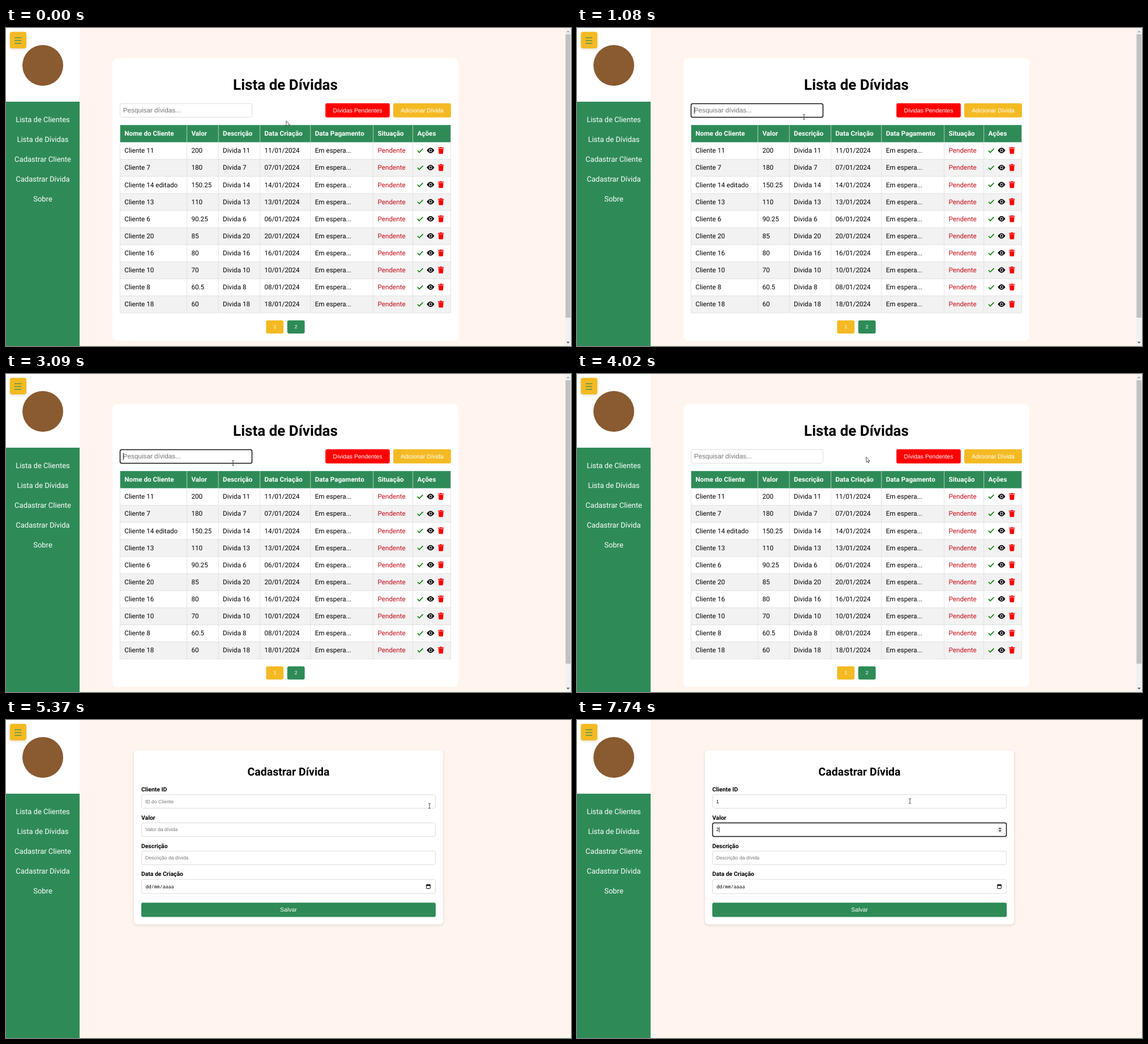
Animation, 998 px wide and 561 px high, one loop 8 s. Source, as an HTML page:

```html
<!DOCTYPE html>
<html lang="pt-BR">
<head>
<meta charset="utf-8">
<title>Lista de Dívidas</title>
<style>
  html, body { margin: 0; width: 100%; height: 100%; overflow: hidden; background: #fff4ee; }
  svg { display: block; width: 100vw; height: 100vh; }
  text { font-family: Roboto, sans-serif; white-space: pre; text-rendering: geometricPrecision; }
  .ui { font-family: "Liberation Sans", Arial, sans-serif; }
  .mono { font-family: "Noto Sans Mono", monospace; }
  .b { font-weight: 700; }
  .mid { text-anchor: middle; }
</style>
</head>
<body>
<svg id="stage" viewBox="0 0 998 561"></svg>
<script>
const LOOP = 8000, BLINK = 530;
const GREEN = '#2e8b57', YELLOW = '#f4ba24', LINE = '#dcdcdc', HINT = '#757575';
const QUERY = 'renildo';

const rect = (x, y, w, h, fill, r = 0, extra = '') =>
  `<rect x="${x}" y="${y}" width="${w}" height="${h}" rx="${r}" fill="${fill}" ${extra}/>`;
const text = (x, y, size, str, cls = '', fill = '#000', id = '') =>
  `<text x="${x}" y="${y}" font-size="${size}" class="${cls}" fill="${fill}" ${id && `id="${id}"`}>${str}</text>`;
const path = (d, extra) => `<path d="${d}" ${extra}/>`;
const group = (id, body) => `<g id="${id}">${body}</g>`;
const button = (x, y, w, h, fill, label, size) =>
  rect(x, y, w, h, fill, 3) + text(x + w / 2, y + h / 2 + size * .34, size, label, 'ui mid', '#fff');

// An input box with a hint, a value, a caret and a focus ring
function field(id, x, y, w, h, size, pad, hint) {
  const base = y + h / 2 + size * .34;
  return rect(x + .5, y + .5, w - 1, h - 1, '#fff', 3, `id="${id}-box"`) +
    text(x + pad, base, size, hint, 'ui', HINT, id + '-hint') +
    text(x + pad, base, size, '', 'ui', '#000', id + '-text') +
    rect(0, y + h / 2 - size * .55, .8, size * 1.1, '#000', 0, `id="${id}-caret"`);
}

const icons = (x, y) =>
  path(`M${x - 4.6} ${y + .3}l3 3.2 6.4 -6.6`, 'fill="none" stroke="#008000" stroke-width="1.6"') +
  path(`M${x + 11.7} ${y}q6.6 -9.6 13.2 0q-6.6 9.6 -13.2 0z`, 'fill="#000"') +
  `<circle cx="${x + 18.3}" cy="${y}" r="2.9" fill="#fff"/><circle cx="${x + 18.3}" cy="${y}" r="1.9" fill="#000"/>` +
  path(`M${x + 31.5} ${y - 5.3}h3l.6 -.8h3l.6 .8h3v1.5h-10.2z` +
       `M${x + 32.2} ${y - 3.1}h8.8l-.6 7.8q-.1 1.3 -1.4 1.3h-4.8q-1.3 0 -1.4 -1.3z`, 'fill="#f00"');

const HEADS = ['Nome do Cliente', 'Valor', 'Descrição', 'Data Criação', 'Data Pagamento', 'Situação', 'Ações'];

function table(cols, rows) {
  const top = 171.2, headH = 30.3, rowH = 30.12;
  const left = cols[0], right = cols[cols.length - 1];
  const bottom = top + headH + rows.length * rowH;
  let out = rect(left, top, right - left, headH, GREEN);
  HEADS.forEach((h, i) => out += text(cols[i] + 7.9, 190.3, 11.7, h, 'b', '#fff'));
  let lines = '';
  rows.forEach((row, r) => {
    const y = top + headH + r * rowH;
    if (r % 2) out += rect(left, y, right - left, rowH, '#f2f2f2');
    [...row, 'Em espera...', 'Pendente'].forEach((s, i) =>
      out += text(cols[i] + 7.9, y + 18.8, 11.7, s, '', i === 5 ? '#c40a14' : '#000'));
    out += icons(cols[6] + 13, y + 14.6);
    lines += `M${left} ${y + rowH}H${right}`;
  });
  cols.forEach(x => lines += `M${x} ${top}V${bottom}`);
  return out + path(lines, `fill="none" stroke="${LINE}" stroke-width=".8"`);
}

function listPage(x, height, cols, rows, pages) {
  const mid = x + 305.5, pageY = 53.3 + height - 36.3;
  let out = rect(x, 53.3, 611, height, '#fff', 8) +
    text(mid, 108.5, 26, 'Lista de Dívidas', 'b mid') +
    button(x + 376.2, 132.8, 113.6, 25, '#f00', 'Dívidas Pendentes', 10.4) +
    button(x + 496, 132.8, 102, 25, YELLOW, 'Adicionar Dívida', 10.4) +
    table(cols, rows);
  for (let i = 0; i < pages; i++)
    out += button(mid - 15.4 - (pages - 1) * 18.7 + i * 37.4, pageY, 30.8, 23.4, i ? GREEN : YELLOW, i + 1, 8.67);
  return out;
}

const debts = [[11, '200'], [7, '180'], [14, '150.25'], [13, '110'], [6, '90.25'],
  [20, '85'], [16, '80'], [10, '70'], [8, '60.5'], [18, '60']].map(([n, value]) =>
  [`Cliente ${n}${n === 14 ? ' editado' : ''}`, value, `Divida ${n}`, `${String(n).padStart(2, '0')}/01/2024`]);

const scrollbar = rect(987.5, 0, 10.5, 561, '#f1f1f1') + rect(988.4, 11, 8.8, 500, '#c1c1c1') +
  path('M990 7.4l2.8 -3 2.8 3z', 'fill="#a3a3a3"') + path('M990 553.6l2.8 3 2.8 -3z', 'fill="#505050"');

const label = (y, s) => text(239, y, 10.4, s, 'b');
const formField = (id, y, hint) => field(id, 239, y, 520, 25, 8.67, 7, hint);
const formPage =
  rect(226, 53.5, 546, 307, '#fff', 6, 'filter="url(#soft)"') +
  text(499, 98, 19.5, 'Cadastrar Dívida', 'b mid') +
  label(125.8, 'Cliente ID') + label(175.6, 'Valor') + label(225.5, 'Descrição') + label(275.4, 'Data de Criação') +
  formField('client', 131.2, 'ID do Cliente') +
  formField('value', 181, 'Valor da dívida') +
  formField('note', 230.8, 'Descrição da dívida') +
  rect(239.5, 281.2, 519, 25, '#fff', 3, `stroke="${LINE}"`) +
  text(246.4, 296.6, 8.4, 'dd/mm/aaaa', 'mono') +
  rect(742.7, 290.8, 6.6, 6.6, 'none', .5, 'stroke="#000" stroke-width="1"') +
  rect(742.4, 290.4, 7.2, 2.2, '#000') + rect(743.6, 289.6, 1, 2, '#000') + rect(747.4, 289.6, 1, 2, '#000') +
  group('spinner', rect(742, 188.4, 10, 10.4, '#efefef') +
    path('M744.4 192.6l2.7 -3 2.7 3zM744.4 194.6l2.7 3 2.7 -3z', 'fill="#404040"')) +
  button(239, 322.3, 520, 25.2, GREEN, 'Salvar', 10.4);

const sidebar = rect(0, 0, 130, 561, GREEN) + rect(0, 0, 130, 130, '#fff') +
  '<circle cx="65" cy="66" r="36" fill="#8a5a30"/>' +
  rect(6.8, 6.8, 29.2, 29.2, YELLOW, 4, 'filter="url(#soft)"') +
  path('M15.2 17.2h11.8m-11.8 5h11.8m-11.8 5h11.8', `stroke="${GREEN}" stroke-width="1.3"`) +
  ['Lista de Clientes', 'Lista de Dívidas', 'Cadastrar Cliente', 'Cadastrar Dívida', 'Sobre']
    .map((s, i) => text(65, 165.8 + i * 35.1, 13, s, 'mid', '#fff')).join('');

const pointers =
  group('arrow', path('M0 0V9.2L2.1 7.3L3.5 10.3L4.9 9.7L3.6 6.8H6.3Z', 'fill="#fff" stroke="#222" stroke-width=".8"')) +
  group('beam', path('M-2 -4.2h1.4l.6 .5 .6 -.5h1.4M0 -3.8V3.8M-2 4.2h1.4l.6 -.5 .6 .5h1.4',
    'fill="none" stroke="#333" stroke-width=".9"')) +
  group('hand', path('M-1 .2q1 -1 2 0V4l4.3 .8q1 .3 .9 1.4L5.5 10.6H.4L-3 6.6q0 -1.3 1.2 -.9l.8 .6z',
    'fill="#fff" stroke="#222" stroke-width=".8"'));

const stage = document.getElementById('stage');
stage.innerHTML =
  '<defs><filter id="soft" x="-20%" y="-20%" width="140%" height="150%">' +
  '<feDropShadow dx="0" dy="1.5" stdDeviation="2" flood-color="#000" flood-opacity=".14"/></filter></defs>' +
  rect(0, 0, 998, 561, '#fff4ee') + rect(130, 560, 868, 1, '#effbdf') +
  group('full', listPage(188, 498.7, [201.4, 319.5, 375.2, 448.6, 537.8, 648.6, 718.6, 785.6], debts, 2) + scrollbar) +
  group('found', listPage(193.8, 227.5, [207.1, 321, 369.1, 444.6, 536.2, 650.1, 722.3, 791.3],
    [['Renildo Tivaro', '50', 'TESTE', '23/06/2024']], 1)) +
  group('search', field('query', 201, 132.9, 234, 25, 11.7, 5.8, 'Pesquisar dívidas...')) +
  group('form', formPage) + sidebar + group('pointer', pointers);

const el = {};
stage.querySelectorAll('[id]').forEach(n => el[n.id] = n);
const show = (id, on) => el[id].setAttribute('display', on ? 'inline' : 'none');

function setField(id, value, focused, lastKey, t) {
  const box = el[id + '-box'], words = el[id + '-text'], caret = el[id + '-caret'];
  box.setAttribute('stroke', focused ? '#101010' : LINE);
  box.setAttribute('stroke-width', focused ? 1.5 : 1);
  words.textContent = value;
  show(id + '-hint', !value);
  caret.setAttribute('x', +words.getAttribute('x') + (value ? words.getComputedTextLength() : 0));
  show(id + '-caret', focused && Math.floor((t - lastKey) / BLINK) % 2 === 0);
}

// Moments of the story, in ms
const AT = {
  focus: 780, type: 1120, found: 1260, erase: 2300, full: 2720, blur: 3860, form: 4920,
  client: 6600, one: 6840, value: 7110, two: 7680
};
const TYPE_GAP = 95, ERASE_GAP = 60;

// Pointer stops: start time, end time, destination
const START = [495, 164];
const MOVES = [[30, 680, 401, 157], [3300, 3800, 511, 146.5], [4080, 4680, 748, 151.5], [6180, 6540, 588, 143]];
function pointerAt(t) {
  let [x, y] = START;
  for (const [from, to, nx, ny] of MOVES) {
    const k = Math.min(1, Math.max(0, (t - from) / (to - from))), e = k * k * (3 - 2 * k);
    x += (nx - x) * e;
    y += (ny - y) * e;
  }
  return [x, y];
}

const presses = (t, start, gap) => Math.max(0, Math.min(QUERY.length, Math.floor((t - start) / gap) + 1));
const latest = (t, ...times) => Math.max(...times.filter(k => k <= t), 0);

function draw(t) {
  const form = t >= AT.form, found = t >= AT.found && t < AT.full;
  show('full', !form && !found);
  show('found', found);
  show('search', !form);
  show('form', form);

  const typed = presses(t, AT.type, TYPE_GAP), erased = presses(t, AT.erase, ERASE_GAP);
  const lastKey = erased ? AT.erase + (erased - 1) * ERASE_GAP
    : typed ? AT.type + (typed - 1) * TYPE_GAP : AT.focus;
  el.search.setAttribute('transform', `translate(${found ? 5.7 : 0} 0)`);
  setField('query', QUERY.slice(0, typed - erased), t >= AT.focus && t < AT.blur, lastKey, t);

  setField('client', t >= AT.one ? '1' : '', t >= AT.client && t < AT.value, latest(t, AT.client, AT.one), t);
  setField('value', t >= AT.two ? '2' : '', t >= AT.value, latest(t, AT.value, AT.two), t);
  setField('note', '', false, 0, t);
  show('spinner', t >= AT.value);

  const [x, y] = pointerAt(t);
  const inside = (l, r) => x > l && x < r && y > 131 && y < 159;
  const beam = form ? inside(239, 759) : inside(201, 435);
  const hand = !form && (inside(564, 678) || inside(684, 786));
  el.pointer.setAttribute('transform', `translate(${x} ${y})`);
  show('beam', beam);
  show('hand', hand);
  show('arrow', !beam && !hand);
}

const begin = performance.now();
function tick() {
  draw((performance.now() - begin) % LOOP);
  requestAnimationFrame(tick);
}
tick();
</script>
</body>
</html>
```
